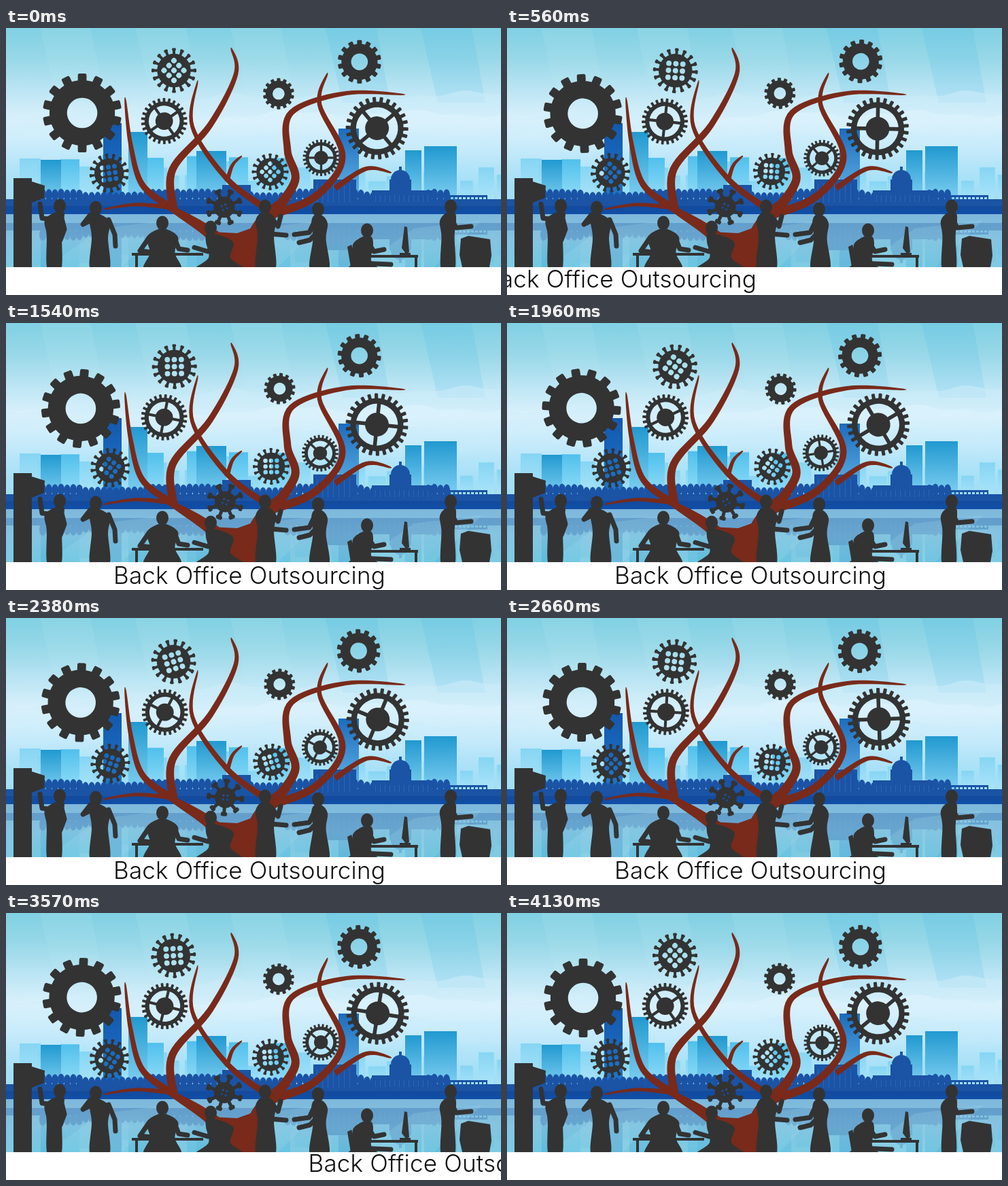
An HTML page with a canvas for the animation above (4200 ms loop, 728 px wide and 393 px high).

```html
<!DOCTYPE html>
<html lang="en">
<head>
<meta charset="utf-8">
<title>Back Office Outsourcing</title>
<style>
  html, body { margin: 0; width: 100%; height: 100%; overflow: hidden; background: #fff; }
  canvas, svg { position: absolute; left: 0; top: 0; width: 728px; height: 393px; }
  text { font: 300 35px Inter, "Open Sans", sans-serif; letter-spacing: .2px; fill: #111; }
</style>
</head>
<body>
<canvas id="stage" width="728" height="393"></canvas>
<svg viewBox="0 0 728 393"><text id="caption" x="158" y="384">Back Office Outsourcing</text></svg>
<script>
const W = 728, GROUND = 352, SHORE = 275, STEP = 70, STEPS = 60, TAU = 2 * Math.PI;
const INK = '#333', NAVY = '#1b53a5', BARK = '#792a1a';
const ctx = document.getElementById('stage').getContext('2d');
const caption = document.getElementById('caption');

let seed = 7;
const random = () => (seed = seed * 16807 % 2147483647) / 2147483647;
const points = s => s.split(' ').map(p => p.split(',').map(Number));

function layer() {
  const c = document.createElement('canvas');
  c.width = W; c.height = 393;
  return c.getContext('2d');
}

// Catmull-Rom samples through a few key points
function curve(pts, closed = false, n = 10) {
  const out = [], last = pts.length - 1;
  const at = i => closed ? pts[(i + pts.length) % pts.length] : pts[Math.max(0, Math.min(last, i))];
  for (let i = 0; i < (closed ? last + 1 : last); i++) {
    const [a, b, c, d] = [at(i - 1), at(i), at(i + 1), at(i + 2)];
    for (let k = 0; k < n; k++) {
      const t = k / n;
      out.push(b.map((v, j) => v + t / 2 * (c[j] - a[j] +
        t * (2 * a[j] - 5 * v + 4 * c[j] - d[j] + t * (3 * (v - c[j]) + d[j] - a[j])))));
    }
  }
  return closed ? out : [...out, pts[last]];
}

function poly(g, pts, fill) {
  g.beginPath();
  pts.forEach(p => g.lineTo(...p));
  g.closePath();
  g.fillStyle = fill;
  g.fill();
}

function box(g, x, y, w, h, fill) {
  g.fillStyle = fill;
  g.fillRect(x, y, w, h);
}

function dot(g, x, y, rx, ry, fill) {
  g.beginPath();
  g.ellipse(x, y, rx, ry, 0, 0, TAU);
  g.fillStyle = fill;
  g.fill();
}

function fade(g, y0, y1, ...colors) {
  const f = g.createLinearGradient(0, y0, 0, y1);
  colors.forEach((c, i) => f.addColorStop(i / (colors.length - 1), c));
  return f;
}

function sky(g) {
  box(g, 0, 0, W, SHORE, fade(g, 0, SHORE, '#80d0e3', '#98d8e8', '#bce5f4', '#dcf2fc', '#bfe8fa', '#a5e0f7', '#9fdcf5'));
  for (let i = 0; i < 5; i++) {
    const x = 50 + 140 * i;
    poly(g, [[x, 0], [x + 75, 0], [x + 95, 110], [x + 25, 110]], i > 2 ? 'rgba(60,175,222,.14)' : 'rgba(190,235,238,.14)');
  }
  // cloud banks rise towards the right
  for (const [drop, color] of [[0, 'rgba(205,236,249,.6)'], [28, 'rgba(226,245,253,.5)'], [60, 'rgba(200,235,250,.4)']]) {
    const top = [];
    for (let x = 0; x <= W; x += 4) {
      const rise = 30 / (1 + Math.exp((240 - x) / 40));
      top.push([x, 128 + drop - rise + 4 * Math.sin(x / 29 + drop) + 2 * Math.sin(x / 11)]);
    }
    poly(g, [...top, [W, 200], [0, 200]], fade(g, 95 + drop, 200, color, 'rgba(200,236,251,0)'));
  }
}

function tower(g, x, y, w, top, bottom) {
  box(g, x, y, w, 263 - y, fade(g, y, 263, top, bottom));
}

function city(g) {
  for (let x = 20; x < W; x += 27) tower(g, x, 192 + 36 * random(), 18 + 14 * random(), '#86d5f3', '#b3e7fb');
  for (let x = 80; x < 440; x += 62) tower(g, x, 183 + 20 * random(), 28, '#50c0ec', '#9fe2fa');
  for (const [x, y, w] of points('51,194,30 180,153,28 280,181,44 587,180,24 615,174,48')) tower(g, x, y, w, '#2199d0', '#8ad6f5');
  tower(g, 143, 140, 27, '#1358ae', '#2179cb');
  tower(g, 489, 148, 30, '#1b6cbd', '#6bbdec');

  for (const [x, y, w] of points('205,240,28 318,231,42 452,223,63 538,239,88 0,252,728')) box(g, x, y, w, 263 - y, NAVY);
  for (let x = 54; x < 650; x += 9) {
    const high = Math.sin(x / 33) > -.2 ? 5 : 1;
    dot(g, x, 250 - high + 2 * random(), 5, 9, NAVY);
  }
  // domed hall and pier
  dot(g, 580, 223, 14, 14, NAVY);
  box(g, 564, 223, 32, 18, NAVY);
  box(g, 578, 204, 4, 8, NAVY);
  for (let x = 457; x < 512; x += 8) box(g, x, 229, 1, 28, '#2768b5');
  for (let x = 543; x < 622; x += 7) box(g, x, 246, 1, 10, '#2768b5');
  box(g, 650, 246, 58, 3, NAVY);
  for (let x = 652; x < 707; x += 6) box(g, x, 248, 2, 14, NAVY);
}

function water(g) {
  // the skyline, mirrored and veiled
  g.save();
  g.translate(0, 2 * SHORE);
  g.scale(1, -1);
  g.drawImage(g.canvas, 0, 190, W, SHORE - 190, 0, 190, W, SHORE - 190);
  g.restore();
  g.globalAlpha = .78;
  box(g, 0, SHORE, W, GROUND - SHORE, fade(g, SHORE, GROUND, '#74aed5', '#7dbddb', '#6ec4de'));
  g.globalAlpha = 1;
  for (let x = 60; x < W; x += 230) {
    poly(g, [[x, GROUND], [x + 80, 295], [x + 180, 283], [x + 110, GROUND]], 'rgba(170,225,235,.18)');
  }
  box(g, 0, 262, W, 12, fade(g, 262, 274, '#134a9d', '#0f4fa8'));
  box(g, 0, 274, W, 2, '#80b7dc');
}

// branches run from tip to root and thicken on the way
function branch(g, path, base) {
  const pts = curve(points(path)), left = [], right = [];
  pts.forEach(([x, y], i) => {
    const a = pts[Math.max(0, i - 1)], b = pts[Math.min(pts.length - 1, i + 1)];
    const half = .5 + base / 2 * (i / pts.length) ** .55, turn = Math.atan2(b[1] - a[1], b[0] - a[0]);
    left.push([x - half * Math.sin(turn), y + half * Math.cos(turn)]);
    right.unshift([x + half * Math.sin(turn), y - half * Math.cos(turn)]);
  });
  poly(g, left.concat(right), BARK);
}

function tree(g) {
  branch(g, '175,102 183,170 200,230 242,264', 10);
  branch(g, '143,267 190,260 242,264', 6);
  branch(g, '331,29 338,68 300,143 245,208 246,266', 12);
  branch(g, '282,77 274,145 325,222 385,268', 9);
  branch(g, '347,188 333,202 325,226', 6);
  branch(g, '587,98 500,96 420,124 414,180 425,225 390,275', 13);
  branch(g, '473,66 461,112 495,190 455,248 390,275', 12);
  branch(g, '567,213 530,207 484,236', 8);
  branch(g, '230,258 295,298 350,345', 24);
  branch(g, '420,244 375,292 354,356', 34);
  poly(g, points('300,300 340,302 368,292 369,352 339,352 334,328'), BARK);
}

// head, body centre, shoulder half-width, foot half-width, arms as shoulder-elbow-hand
function person(g, x, y, mid, wide, foot, ...arms) {
  dot(g, x, y, 9, 10.5, INK);
  const side = s => [[x + s * 6, y + 9], [mid + s * wide, y + 21], [mid + s * wide * .8, y + 44], [mid + s * foot, GROUND + 4]];
  poly(g, curve([...side(1), ...side(-1).reverse()], true), INK);
  g.strokeStyle = INK;
  g.lineCap = g.lineJoin = 'round';
  g.lineWidth = 7;
  for (const arm of arms) {
    g.beginPath();
    points(arm).forEach(p => g.lineTo(...p));
    g.stroke();
  }
}

function table(g, x, y, w, leg) {
  box(g, x, y, w, 4, INK);
  box(g, leg, y, 4, GROUND - y, INK);
}

function office(g) {
  person(g, 79, 262, 71, 14, 10, '63,281 53,280 50,259', '82,280 86,296 80,312');
  person(g, 132, 265, 138, 15, 14, '125,283 113,289 124,275', '151,282 160,304 161,321');
  person(g, 230, 287, 230, 23, 26, '210,309 197,328 222,331', '248,309 254,325 267,327');
  person(g, 301, 294, 314, 20, 34, '311,313 297,329 277,323');
  person(g, 381, 263, 382, 15, 14, '392,281 400,292 404,277', '390,303 412,305');
  person(g, 459, 267, 461, 12, 14, '454,284 446,301 424,304', '458,300 447,312 431,316');
  person(g, 531, 298, 525, 15, 22, '533,316 541,329 556,326', '520,346 566,348');
  person(g, 654, 263, 650, 12, 10, '656,282 662,294 684,292', '645,282 644,300');

  box(g, 11, 221, 27, 131, INK);
  poly(g, points('38,226 57,232 56,250 38,257'), INK);
  table(g, 185, 331, 105, 190);
  table(g, 536, 334, 70, 601);
  box(g, 579, 331, 16, 4, INK);
  poly(g, points('586,292 590,293 593,330 588,332 582,324'), INK);
  poly(g, points('502,322 508,319 520,352 507,352'), INK);
  poly(g, points('669,310 680,306 712,311 714,335 711,352 671,352 667,334'), INK);
  g.clearRect(0, GROUND, W, 41);
}

// x, y, radius, turn direction, start angle, sway start
const GEARS = {
  plain: [[110.8, 125, 58, 1, 0, 0], [519.4, 49, 32, -1, 0, 60], [401.7, 97, 23, 1, 0, 200]],
  wheel: [[233, 138, 34, -1, 55, 250], [546, 148.6, 46, -1, 50, 252], [462.6, 191, 27, 1, 0, 0]],
  grid: [[247, 63.5, 33, 1, 45, 270], [152.6, 213.7, 29, 1, -8, 180], [389.4, 211.7, 27, 1, 45, 180]],
  paddle: [[321.8, 263.8, 27.5, 1, 22.5, 180]]
};
// sizes as shares of the radius
const SHAPE = {
  plain: { teeth: 14, body: .83, tooth: .22, tip: .22, hole: .385 },
  wheel: { teeth: 26, body: .85, tooth: .11, tip: .09, hole: .67 },
  grid: { teeth: 16, body: .75, tooth: .12, tip: .17, hole: .12 },
  paddle: { teeth: 8, body: .56, tooth: .18, tip: .34, hole: .06 }
};

function holes(kind, hole) {
  const ring = (x, y) => { ctx.moveTo(x + hole, y); ctx.arc(x, y, hole, 0, TAU); };
  const gap = hole * 2.6;
  if (kind === 'grid') {
    for (let i = 0; i < 9; i++) ring((i % 3 - 1) * gap, (Math.floor(i / 3) - 1) * gap);
  } else if (kind === 'paddle') {
    for (let i = 0; i < 4; i++) ring(gap * Math.cos(i * TAU / 4), gap * Math.sin(i * TAU / 4));
  } else ring(0, 0);
}

function gear(kind, [x, y, R, dir, start, swayStart], turn) {
  const { teeth, body, tooth, tip, hole } = SHAPE[kind];
  const a = (swayStart + dir * turn) * TAU / 360, sway = .6 + R / 90;
  ctx.save();
  ctx.translate(x + sway * Math.cos(a), y + sway * Math.sin(a));
  ctx.rotate((start + dir * turn) * TAU / 360);
  ctx.scale(R, R);
  ctx.beginPath();
  ctx.arc(0, 0, body, 0, TAU);
  holes(kind, hole);
  ctx.fill('evenodd');
  if (kind === 'wheel') {
    dot(ctx, 0, 0, .38, .38, INK);
    ctx.fillRect(-.75, -.06, 1.5, .12);
    ctx.fillRect(-.06, -.75, .12, 1.5);
  }
  for (let i = 0; i < teeth; i++) {
    ctx.beginPath();
    ctx.roundRect(-tooth / 2, -1, tooth, 1.04 - body, tooth / 5);
    ctx.roundRect(-tip / 2, -1, tip, (1 - body) / 2, tip / 4);
    ctx.fill();
    ctx.rotate(TAU / teeth);
  }
  ctx.restore();
}

const back = layer(), front = layer();
[sky, city, water, tree].forEach(paint => paint(back));
box(back, 0, GROUND, W, 41, '#fff');
office(front);

// the caption slides in during 12 steps, rests, and slides out during 12
function slide(step) {
  const x = 573 * (Math.min(0, step / 12 - 1) + Math.max(0, (step - 45) / 12));
  caption.setAttribute('transform', `translate(${x} ${-Math.abs(x) / 100})`);
}

function draw() {
  const step = Math.floor(performance.now() % (STEP * STEPS) / STEP);
  const turn = 360 * step / (STEPS - 1);
  ctx.drawImage(back.canvas, 0, 0);
  ctx.fillStyle = INK;
  for (const kind in GEARS) GEARS[kind].forEach(spec => gear(kind, spec, turn));
  ctx.drawImage(front.canvas, 0, 0);
  slide(step);
  requestAnimationFrame(draw);
}
draw();
</script>
</body>
</html>
```
